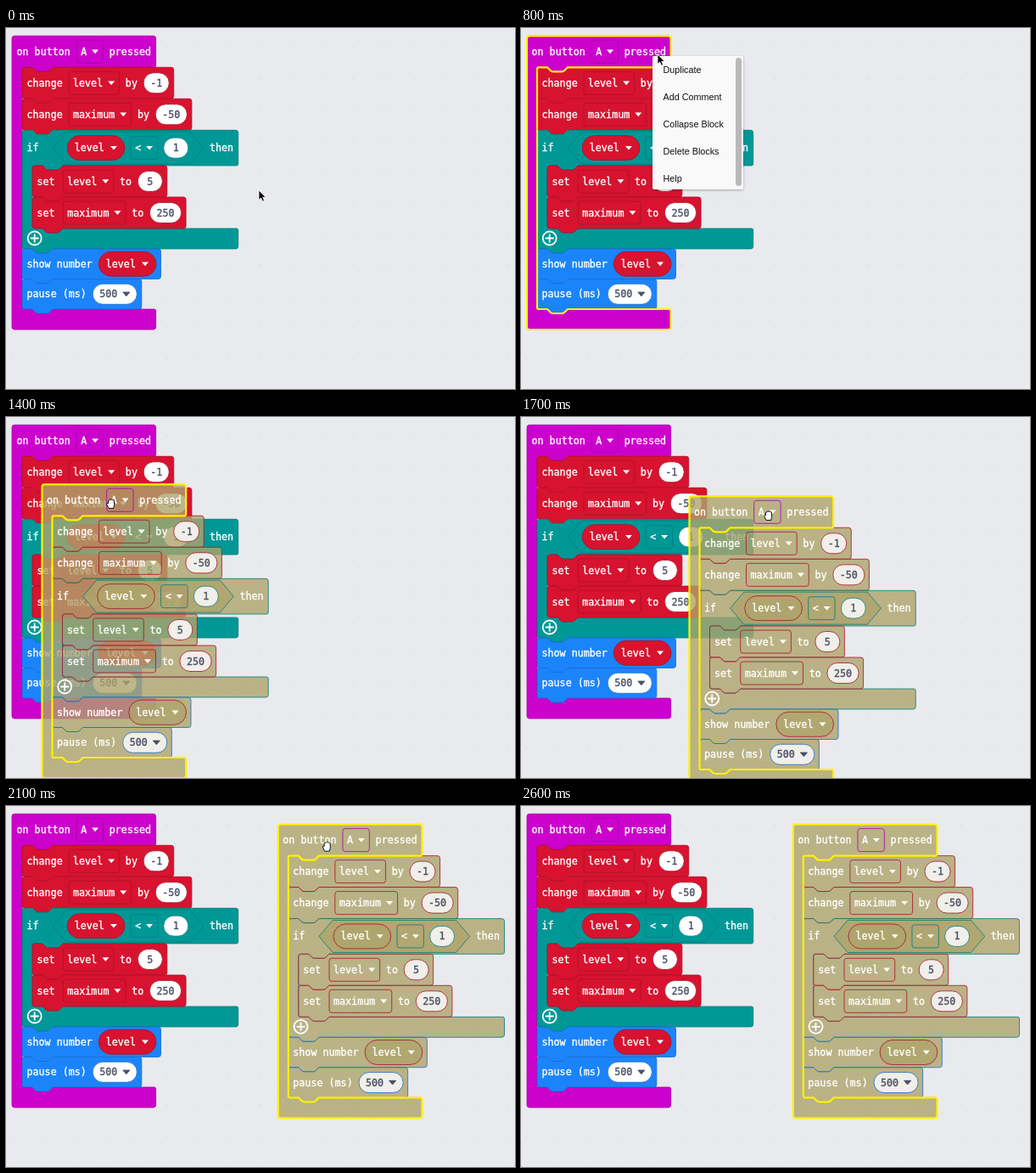
An HTML page that plays this animation: 600 px wide and 425 px high, repeating every 2.7 s.

```html
<!DOCTYPE html>
<html lang="en">
<head>
<meta charset="utf-8">
<title>Duplicate a block</title>
<style>
  html, body { margin: 0; width: 100%; height: 100%; overflow: hidden; background: #e9eaed; }
  svg { display: block; width: 600px; height: 425px; }
  text { font: 11.7px "DejaVu Sans Mono", monospace; fill: #fff; stroke: #fff; stroke-width: .35; }
  .dark { fill: #4c5068; stroke: #4c5068; }
  .middle { text-anchor: middle; }
  .body, .field, .pill { stroke-width: .8; }
  .purple { fill: #cc02cc; stroke: #a802a8; }
  .red { fill: #d7132f; stroke: #ab1029; }
  .teal { fill: #009896; stroke: #007b7c; }
  .blue { fill: #1b84fb; stroke: #176bcb; }
  .pill { fill: #fff; }
  .field { fill: none; }
  .icon { fill: none; stroke: #fff; stroke-width: 1.8; }
  .outline { fill: none; stroke: #fff200; stroke-width: 2.2; visibility: hidden; }
  .selected .outline { visibility: visible; }
  #copy .body { fill: url(#hatch); fill-opacity: .8; }
  #copy .pill { fill: #f0efe9; }
  #menu text { font: 10.8px "Liberation Sans", Arial, sans-serif; fill: #111; stroke: none; }
</style>
</head>
<body>
<svg viewBox="0 0 600 425">
  <defs>
    <pattern id="hatch" width="5.8" height="5.8" patternUnits="userSpaceOnUse">
      <path fill="#a9a17c" d="M0 0h5.8v5.8H0z"/>
      <path stroke="#b9ab48" stroke-width="1.2" d="M-1 6.8L6.8 -1M-1 1L1 -1M4.8 6.8l2-2"/>
    </pattern>
    <pattern id="grid" x="5" y="22" width="36.6" height="36.6" patternUnits="userSpaceOnUse">
      <path stroke="#dcdde1" d="M0 1h3"/>
    </pattern>
    <filter id="shadow"><feDropShadow dx="0" dy="1" stdDeviation="1.5" flood-opacity=".3"/></filter>
  </defs>
  <rect width="600" height="425" fill="url(#grid)"/>
  <g id="stack"></g>
  <g id="copy" class="selected"></g>
  <g id="menu">
    <rect x="155" y="33" width="107" height="157" rx="2" fill="#f9f9f9" filter="url(#shadow)"/>
    <rect x="253" y="35" width="7" height="151" rx="3.5" fill="#b9b9b9"/>
  </g>
  <path id="arrow" d="M0 0V11.4l2.6-2.3 1.9 4.1 2-.9-1.8-4h3.5z" stroke="#fff" stroke-width=".8"/>
  <path id="hand" fill="#fff" stroke="#111"
    d="M-3 5.5L-5 1.5q-1-2 .8-2.2l.7.6V-3q.2-1.4 1.6-1.2.6-1.3 1.9-.6 1.2-.7 1.9.5 1.6-.3 1.7 1.2V1.5L2.7 5.5z"/>
</svg>
<script>
const $ = id => document.getElementById(id);
const CHAR = 7.05, GAP = 7.2, PAD = 5.5, ARM = 12, FOOT = 24;
const ROW = { purple: 37, red: 37, teal: 41.7, blue: 35.5 };

const path = (cls, d) => `<path class="${cls}" d="${d}"/>`;
const label = (x, y, s, cls = '') =>
  `<text x="${x}" y="${y + 4}" class="${cls}">${s.replace('<', '&lt;')}</text>`;
const arrow = (x, y, cls = '') => `<path fill="#fff" stroke="none" class="${cls}" d="M${x - 4} ${y - 2.2}h8l-4 4.6z"/>`;
const box = (cls, x, y, w, h, r) =>
  `<rect class="${cls}" x="${x}" y="${y - h / 2}" width="${w}" height="${h}" rx="${r}"/>`;

// Row items know their width and draw themselves around the row's centre line.
const item = (w, draw) => ({ w, draw });
const text = s => item(s.length * CHAR, (x, y) => label(x, y, s));
const lead = s => ({ ...text(s), w: Math.max(23.5, s.length * CHAR) });
const field = s => {
  const w = s.length * CHAR + 24.4;
  return item(w, (x, y, color) => box(color + ' field', x, y, w, 27, 3) + label(x + 5, y, s) + arrow(x + w - 9.5, y));
};
const number = s => {
  const w = Math.max(29, s.length * CHAR + 16);
  return item(w, (x, y, color) => box(color + ' pill', x, y, w, 24, 12) + label(x + w / 2, y, s, 'dark middle'));
};
const choice = s => {
  const w = s.length * CHAR + 31;
  return item(w, (x, y, color) =>
    box(color + ' pill', x, y, w, 24, 12) + label(x + 8, y, s, 'dark') + arrow(x + w - 12.5, y, 'dark'));
};
const variable = s => {
  const w = s.length * CHAR + 32.5;
  return item(w, (x, y) => box('red body', x, y, w, 29, 14.5) + label(x + 8.5, y, s) + arrow(x + w - 13, y));
};
const widthOf = items => items.reduce((sum, i) => sum + i.w + GAP, -GAP);
const drawRow = (items, x, y, color) => items.map(i => {
  const part = i.draw(x, y, color);
  x += i.w + GAP;
  return part;
}).join('');
const condition = (...items) => {
  const w = widthOf(items) + 35;
  return item(w, (x, y, color) =>
    path('body ' + color, `M${x} ${y}l16-19h${w - 32}l16 19l-16 19h${32 - w}z`) + drawRow(items, x + 17, y, color));
};

const block = (color, row, body = [], hat = false) => ({ color, row, body, hat });
const heightOf = ({ color, body }) =>
  ROW[color] + (body.length && FOOT + body.reduce((sum, b) => sum + heightOf(b), 0));

const NOTCH = 'l4 4q1 1 3 1h10q2 0 3-1l4-4';
const TAB = 'l-4 4q-1 1-3 1h-10q-2 0-3-1l-4-4';

function outline(b, x, y) {
  const right = x + widthOf(b.row) + 2 * PAD, bottom = y + heightOf(b), inner = x + ARM;
  let d = `M${x} ${y + 3}q0-3 3-3` + (b.hat ? '' : `H${x + 12}${NOTCH}`) + `H${right - 3}q3 0 3 3`;
  if (b.body.length) {
    const top = y + ROW[b.color], foot = bottom - FOOT;
    d += `V${top - 2}q0 2-2 2H${inner + 36}${TAB}H${inner + 2}q-2 0-2 2V${foot - 2}q0 2 2 2` +
      `H${inner + 12}${NOTCH}H${right - 2}q2 0 2 2`;
  }
  return d + `V${bottom - 3}q0 3-3 3` + (b.hat ? '' : `H${x + 36}${TAB}`) + `H${x + 3}q-3 0-3-3z`;
}

function drawBlock(b, x, y) {
  const shape = outline(b, x, y), foot = y + heightOf(b) - FOOT;
  let svg = path('body ' + b.color, shape) + drawRow(b.row, x + PAD, y + ROW[b.color] / 2, b.color);
  if (b.body.length && !b.hat)
    svg += path('icon', `M${x + 6.7} ${foot + 11.5}a8 8 0 1 1 16 0 8 8 0 1 1-16 0m3 0h10m-5-5v10`);
  let top = y + ROW[b.color];
  for (const child of b.body) {
    svg += drawBlock(child, x + ARM, top);
    top += heightOf(child);
  }
  return svg + (b.hat ? path('outline', shape) : '');
}

const change = (name, n) => block('red', [lead('change'), field(name), text('by'), number(n)]);
const set = (name, n) => block('red', [lead('set'), field(name), text('to'), number(n)]);
const program = block('purple', [lead('on button'), field('A'), text('pressed')], [
  change('level', '-1'),
  change('maximum', '-50'),
  block('teal', [lead('if'), condition(variable('level'), field('<'), number('1')), text('then')], [
    set('level', '5'),
    set('maximum', '250')
  ]),
  block('blue', [lead('show number'), variable('level')]),
  block('blue', [lead('pause (ms)'), choice('500')])
], true);

$('stack').innerHTML = $('copy').innerHTML = drawBlock(program, 7, 9.3);
$('menu').innerHTML += ['Duplicate', 'Add Comment', 'Collapse Block', 'Delete Blocks', 'Help']
  .map((s, i) => `<text x="167.5" y="${52.5 + 32 * i}">${s}</text>`).join('');

// Key points are [ms, x, y].
const POINTER = [
  [0, 298, 191], [600, 155, 33], [800, 161, 31], [1000, 188, 49], [1300, 119, 94],
  [1400, 124, 102], [1700, 292, 116], [1900, 378, 49], [2200, 379, 47], [2500, 463, 398]
];
const COPY = [[1200, 28, 62], [1400, 35.5, 70], [1700, 191.5, 84], [1900, 312.5, 16], [2100, 313.8, 12.3]];

function at(keys, t) {
  const next = keys.findIndex(k => k[0] > t);
  if (next < 1) return keys.at(next).slice(1);
  const [t0, x0, y0] = keys[next - 1], [t1, x1, y1] = keys[next];
  const p = (t - t0) / (t1 - t0);
  return [x0 + (x1 - x0) * p, y0 + (y1 - y0) * p];
}

const show = (id, on) => $(id).setAttribute('visibility', on ? 'visible' : 'hidden');
const move = (id, point) => $(id).setAttribute('transform', `translate(${point})`);

const start = performance.now();
function draw(now) {
  const t = Math.floor(Math.max(0, now - start) % 2700 / 100) * 100;
  const dragging = t >= 1300 && t < 2300;
  $('stack').classList.toggle('selected', t >= 600 && t < 1200);
  $('copy').style.display = t >= 1200 ? '' : 'none';
  show('menu', t >= 700 && t < 1200);
  show('hand', dragging);
  show('arrow', !dragging && t < 2600);
  move('copy', at(COPY, t));
  move('hand', at(POINTER, t));
  move('arrow', at(POINTER, t));
  requestAnimationFrame(draw);
}
draw(start);
</script>
</body>
</html>
```
